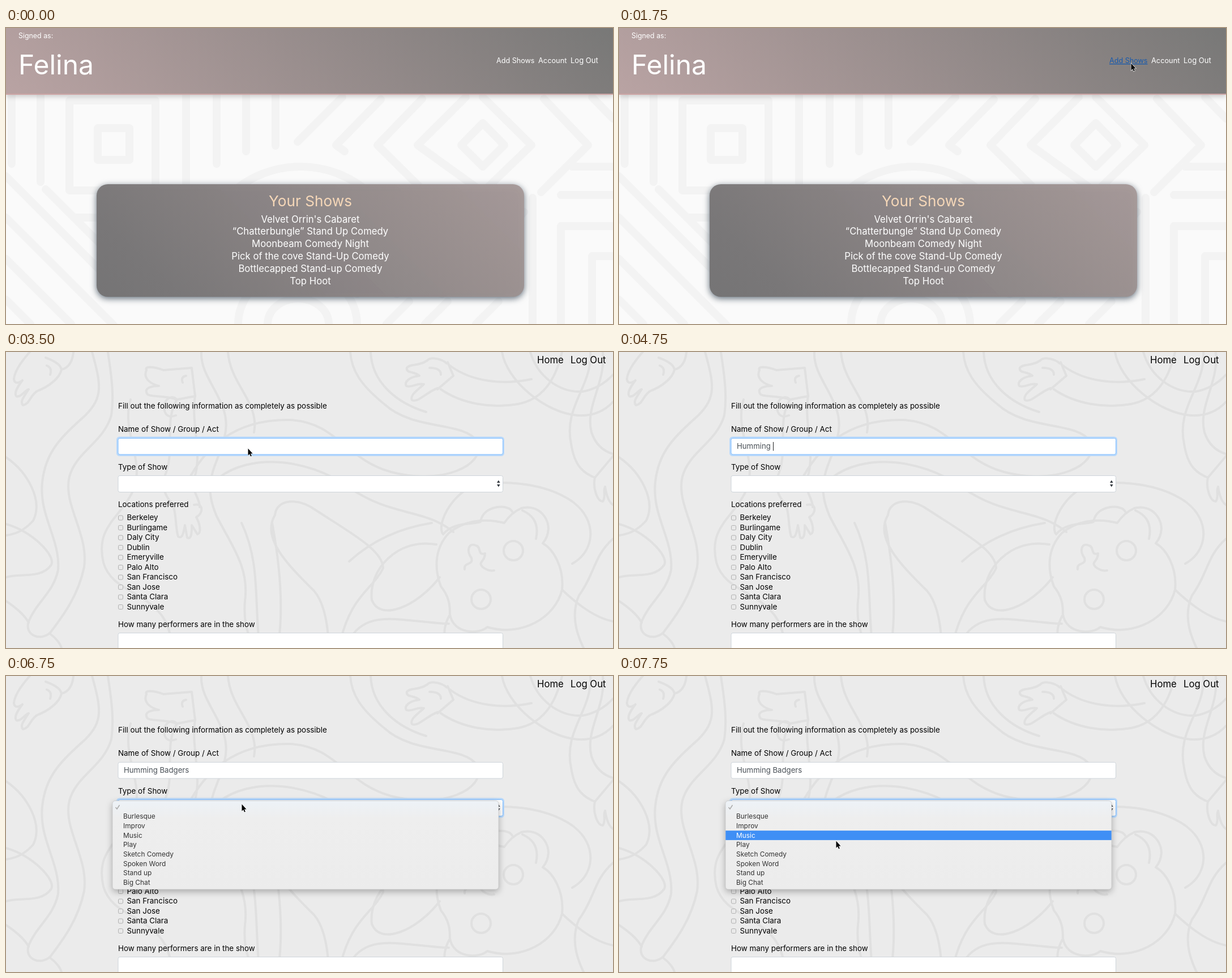
Recreate the animation shown at these times as an HTML page. Size 1072 by 523 pixels, loop 8 s.

```html
<!DOCTYPE html>
<html lang="en">
<head>
<meta charset="utf-8">
<title>Show sign-up</title>
<style>
  html, body { margin: 0; width: 100%; height: 100%; overflow: hidden; }
  svg { display: block; width: 1072px; height: 523px; font-family: Inter, "Open Sans", sans-serif; }
  text { white-space: pre; font-weight: 400; }
  .lines { fill: none; stroke-linecap: round; stroke-linejoin: round; }
  #tiles { stroke: #f3f3f3; stroke-width: 14; }
  #doodle { stroke: #e0e0e0; stroke-width: 4; }
  #dash text { fill: #fff; }
  #dash #title { fill: #f5d7b8; }
  #dash #addLink.hover { fill: #1659ad; text-decoration: underline; }
  #header { filter: drop-shadow(0 3px 5px rgba(0,0,0,.2)); }
  #card { filter: drop-shadow(0 3px 6px rgba(58,72,88,.8)); }
  .field { fill: #fff; stroke: #ced4da; }
  .field.focus { stroke: #80bdff; }
  .glow { fill: none; stroke: #b9d9fb; stroke-width: 3; }
  .box { fill: #e9e9e9; stroke: #b0b0b0; }
  #form #typed { fill: #495057; }
  #menu text { fill: #333; }
  #menu text.on { fill: #fff; }
  #panel { filter: drop-shadow(0 4px 6px rgba(0,0,0,.28)); }
</style>
</head>
<body>
<svg viewBox="0 0 1072 523">
  <defs>
    <linearGradient id="headFill" gradientUnits="userSpaceOnUse" x1="239" y1="355" x2="833" y2="-239">
      <stop stop-color="#b9a3a3"/><stop offset="1" stop-color="#787877"/>
    </linearGradient>
    <linearGradient id="cardFill" gradientUnits="userSpaceOnUse" x1="299" y1="614" x2="776" y2="137">
      <stop stop-color="#757475"/><stop offset=".15" stop-color="#797778"/>
      <stop offset="1" stop-color="#a89b9a" stop-opacity=".97"/>
    </linearGradient>
    <linearGradient id="menuFill" x2="0" y2="1">
      <stop stop-color="#edf2f7"/><stop offset=".2" stop-color="#eee"/><stop offset="1" stop-color="#ececec"/>
    </linearGradient>
  </defs>

  <g id="dash">
    <rect width="1072" height="523" fill="#fafafa"/>
    <g id="tiles" class="lines">
      <path d="M10 118V240M61 118V272M112 128H264V287H112ZM162 177H218V233H162ZM318 118V285M372 118V240M424 118V218M476 118V208"/>
      <path d="M594 122L515 201M662 126L583 207L598 218"/>
      <path d="M842 168L880 207L842 245L804 207ZM842 122L928 207L842 290L727 207L812 122M735 125L656 207L740 290M950 125L1028 207L945 290"/>
      <path d="M1000 245H1072M980 295H1072M1035 122L1072 160"/>
      <path d="M0 262L165 427M0 335L190 525M0 408L115 523M0 480L43 523M70 285L165 380M120 335H165"/>
      <path d="M345 410A175 165 0 0 1 695 410M395 410A125 118 0 0 1 645 410"/>
      <path d="M410 523A105 95 0 0 1 620 523M462 523A54 45 0 0 1 570 523"/>
      <path d="M620 470L790 300M690 470L850 310M770 470L915 325"/>
      <path d="M672 523L712 483M740 523L780 483M830 523L870 483M980 523V350H1072M1035 523V403H1072M930 523V300"/>
    </g>
    <g id="header">
      <rect width="1072" height="117" fill="url(#headFill)"/>
      <rect y="116" width="1072" height="2" fill="#cda5a5"/>
    </g>
    <rect id="card" x="160" y="276" width="755" height="199" rx="20" fill="url(#cardFill)"/>
  </g>

  <g id="form">
    <rect width="1072" height="523" fill="#ebebeb"/>
    <g id="doodle" class="lines">
      <path d="M42 0C26 18 15 34 14 48C15 57 23 55 29 50M29 50C20 62 14 72 18 78C25 82 33 68 40 66C32 78 24 88 30 94C42 92 43 76 55 69C76 61 95 46 98 31C96 20 80 14 70 10M72 24Q82 28 78 40M98 31C112 28 118 14 119 0"/>
      <path d="M152 0C168 58 172 80 140 112C98 150 70 175 64 230C58 290 96 330 92 385C84 425 55 440 40 476C32 500 60 512 78 496C104 462 128 428 138 380C146 320 100 270 112 220C124 176 172 160 186 112C192 72 184 30 180 0"/>
      <path d="M0 186C38 212 66 262 48 298C30 318 14 322 0 324M0 304C48 318 88 360 80 376C62 402 24 390 0 398M0 440Q30 460 40 478M78 498Q94 510 98 523"/>
      <path d="M248 32C244 24 262 26 278 32L328 28L334 78L302 84C280 76 256 80 250 75C242 64 256 60 270 60C254 56 242 46 248 32ZM318 42Q308 44 312 54M302 84C292 74 276 84 280 104Q284 118 300 112"/>
      <path d="M334 78C326 124 348 182 332 224C326 244 344 262 342 274M302 84C278 122 300 176 280 220C274 240 284 258 292 266M220 84C202 142 250 196 222 250C198 296 158 310 172 372C186 420 238 420 274 464Q292 488 292 523"/>
      <path d="M292 266C302 282 298 306 304 326C312 332 314 316 316 306L320 328C328 332 328 318 328 306L338 322C346 320 342 302 336 292C350 284 348 266 332 270"/>
      <path d="M345 0C342 50 402 88 386 150C374 202 344 226 372 290C398 342 430 380 422 440Q418 490 440 523M392 0C396 58 448 88 438 142"/>
      <path d="M320 230C350 172 400 118 502 120C584 124 600 190 680 212C770 236 850 200 832 158C810 122 720 140 668 92C626 58 610 32 608 0M644 0C646 54 690 90 742 106"/>
      <path d="M376 222C430 180 530 186 604 238C680 292 740 276 790 318M475 288C478 260 514 256 548 280C606 318 666 350 666 382C648 420 606 430 588 523"/>
      <path d="M475 288C450 330 500 378 544 422Q568 450 570 523M416 302C450 374 438 442 448 523M470 302C486 388 490 460 480 523"/>
      <path d="M778 20C770 12 750 8 744 15C728 26 714 20 708 28C706 38 722 34 730 42C712 44 703 53 707 60C716 64 726 54 738 57C726 68 713 76 717 85C728 90 744 70 762 64M780 18L790 42L762 66M748 28Q768 28 768 40"/>
      <path d="M784 24C824 54 880 58 928 48M768 66C806 92 858 100 904 92C946 84 970 52 982 0M876 0C884 50 952 108 1010 112Q1048 114 1072 88M926 0C938 42 976 72 1018 70Q1050 64 1072 40"/>
      <path d="M1032 0C1036 60 984 96 998 162C1004 202 1020 214 1040 222L1072 184M1054 0C1060 54 1022 96 1034 142Q1044 172 1072 180M1040 222C1036 240 1044 264 1054 264C1060 256 1054 246 1058 238Q1062 264 1072 270"/>
      <path d="M760 340C690 328 640 386 646 438C660 476 724 452 766 398M600 523C628 446 700 478 782 480M606 370C650 330 702 310 752 302"/>
      <path d="M772 322C762 310 776 268 814 242C866 222 950 230 1000 264C1046 298 1040 352 1000 374M772 322C792 298 826 306 838 300C842 270 888 268 894 282"/>
      <path d="M782 320C754 350 758 388 768 414C784 434 784 450 784 464C790 498 834 500 850 486C910 504 970 470 982 420C986 380 966 348 948 338C974 306 944 266 910 276C892 284 884 296 880 302C840 292 806 300 782 320ZM912 280Q944 294 936 330"/>
      <path d="M1072 330C1038 360 1040 392 1012 430Q994 470 1020 523M982 420Q1032 468 1072 476M784 464Q768 490 778 523"/>
      <path d="M810 384C808 370 826 378 822 364C812 350 818 336 830 342C840 344 832 360 846 356C846 372 832 370 842 380Q852 388 862 386"/>
      <circle cx="896" cy="351" r="17"/><circle cx="839" cy="437" r="17"/>
    </g>
    <rect id="nameGlow" class="glow" x="196.5" y="151" width="682" height="31.5" rx="4"/>
    <rect id="nameField" class="field" x="198" y="152.5" width="679.5" height="28.5" rx="3"/>
    <text id="typed" x="208" y="171" font-size="13.2"></text>
    <rect id="caret" y="159" width="1" height="15.5" fill="#222"/>
    <rect id="typeGlow" class="glow" x="196.5" y="217" width="682" height="32" rx="4"/>
    <rect id="typeField" class="field" x="198" y="218.5" width="679.5" height="29" rx="3"/>
    <path d="M867 231L869.8 226.5L872.6 231ZM867 234L869.8 238.5L872.6 234Z" fill="#343a40"/>
    <rect class="field" x="198" y="496.5" width="679.5" height="40" rx="3"/>
  </g>

  <g id="menu">
    <rect id="panel" x="188" y="220.5" width="682" height="156.5" rx="5" fill="url(#menuFill)" stroke="#c4c4c4" stroke-width=".7"/>
    <path d="M193.5 232L196 235L200.5 228" fill="none" stroke="#aaa" stroke-width="1.5"/>
    <rect id="bar" x="188.3" width="681.4" height="16.7" fill="#3f8ff5"/>
  </g>

  <path id="arrow" d="M.5 .5V12.8L3.2 10.2L5 14.6L6.8 13.8L5 9.5H8.6Z" stroke="#fff" stroke-width="1.2" paint-order="stroke"/>
  <path id="beam" d="M-3 -8Q0 -8 0 -6Q0 -8 3 -8M0 -6V6M-3 8Q0 8 0 6Q0 8 3 8" fill="none" stroke="#333"/>
</svg>

<script>
const $ = id => document.getElementById(id);

function label(parent, x, y, size, str, anchor = 'start') {
  const el = document.createElementNS('http://www.w3.org/2000/svg', 'text');
  el.setAttribute('x', x);
  el.setAttribute('y', y);
  el.setAttribute('font-size', size);
  el.setAttribute('text-anchor', anchor);
  el.textContent = str;
  $(parent).append(el);
  return el;
}

// Dashboard text
label('dash', 22, 18, 12.4, 'Signed as:');
label('dash', 22, 82, 48, 'Felina');
label('dash', 866, 62, 12.6, 'Add Shows').id = 'addLink';
label('dash', 940, 62, 12.8, 'Account');
label('dash', 997, 62, 13, 'Log Out');
label('dash', 537.5, 315, 26.2, 'Your Shows', 'middle').id = 'title';
['Velvet Orrin\'s Cabaret', '“Chatterbungle” Stand Up Comedy', 'Moonbeam Comedy Night',
  'Pick of the cove Stand-Up Comedy', 'Bottlecapped Stand-up Comedy', 'Top Hoot']
  .forEach((show, i) => label('dash', 537.5, 343.5 + 21.9 * i, 16.7, show, 'middle'));

// Form text
label('form', 938, 20, 16.7, 'Home');
label('form', 997, 20, 16.7, 'Log Out');
[[100, 'Fill out the following information as completely as possible'],
  [141, 'Name of Show / Group / Act'], [207.5, 'Type of Show'],
  [273.5, 'Locations preferred'], [485.5, 'How many performers are in the show']]
  .forEach(([y, str]) => label('form', 198, y, 13.4, str));
['Berkeley', 'Burlingame', 'Daly City', 'Dublin', 'Emeryville', 'Palo Alto',
  'San Francisco', 'San Jose', 'Santa Clara', 'Sunnyvale'].forEach((city, i) => {
  const y = 297.3 + 17.5 * i;
  const box = $('nameField').cloneNode();
  box.removeAttribute('id');
  box.setAttribute('class', 'box');
  Object.entries({ x: 198.5, y: y - 8.3, width: 8, height: 8, rx: 2 })
    .forEach(([key, value]) => box.setAttribute(key, value));
  $('form').append(box);
  label('form', 213.5, y, 13.4, city);
});

const options = ['Burlesque', 'Improv', 'Music', 'Play', 'Sketch Comedy', 'Spoken Word', 'Stand up', 'Big Chat']
  .map((str, i) => label('menu', 207, 252.3 + 16.65 * i, 11.9, str));

const act = 'Humming Badgers';

// [time, value...] rows; each holds until the next
const pointer = [[0, -50, 0], [500, 40, 96], [750, 310, 52], [1000, 610, 13], [1250, 850, 36], [1500, 904, 62],
  [2250, 850, 92], [2500, 640, 136], [2750, 470, 168], [3000, 430, 172], [3250, 427, 170],
  [3750, -50, 0], [5500, 654, 177], [5750, 427, 170], [6250, 420, 205], [6500, 416, 226],
  [7250, 408, 248], [7500, 394, 270], [7750, 383, 291]];
const typing = [[0, 0], [3750, 1], [4000, 3], [4250, 5], [4500, 7], [4750, 8], [5000, 10], [5250, 12], [5500, 14], [5750, 15]];
const picks = [[0, -1], [7250, 0], [7500, 1], [7750, 2]];
const at = (rows, t) => rows.findLast(row => row[0] <= t).slice(1);

const show = (id, on) => $(id).style.display = on ? '' : 'none';

function draw(t) {
  show('dash', t < 2000);
  show('form', t >= 2000);
  $('addLink').classList.toggle('hover', t >= 1500);

  const nameOn = t >= 3250 && t < 6500, typeOn = t >= 6500;
  show('nameGlow', nameOn);
  show('typeGlow', typeOn);
  $('nameField').classList.toggle('focus', nameOn);
  $('typeField').classList.toggle('focus', typeOn);

  const [count] = at(typing, t);
  $('typed').textContent = act.slice(0, count);
  show('caret', nameOn && count > 0);
  if (nameOn) $('caret').setAttribute('x', 208.5 + $('typed').getComputedTextLength());

  const [pick] = at(picks, t);
  show('menu', t >= 6750);
  show('bar', pick >= 0);
  $('bar').setAttribute('y', 239.9 + 16.65 * pick);
  options.forEach((el, i) => el.classList.toggle('on', i === pick));

  const [x, y] = at(pointer, t);
  $('arrow').setAttribute('transform', `translate(${x} ${y})`);
  show('beam', t >= 5250 && t < 5500);
  $('beam').setAttribute('transform', 'translate(648 176)');
}

const start = performance.now();
function tick() {
  draw((performance.now() - start) % 8000);
  requestAnimationFrame(tick);
}
tick();
</script>
</body>
</html>
```
